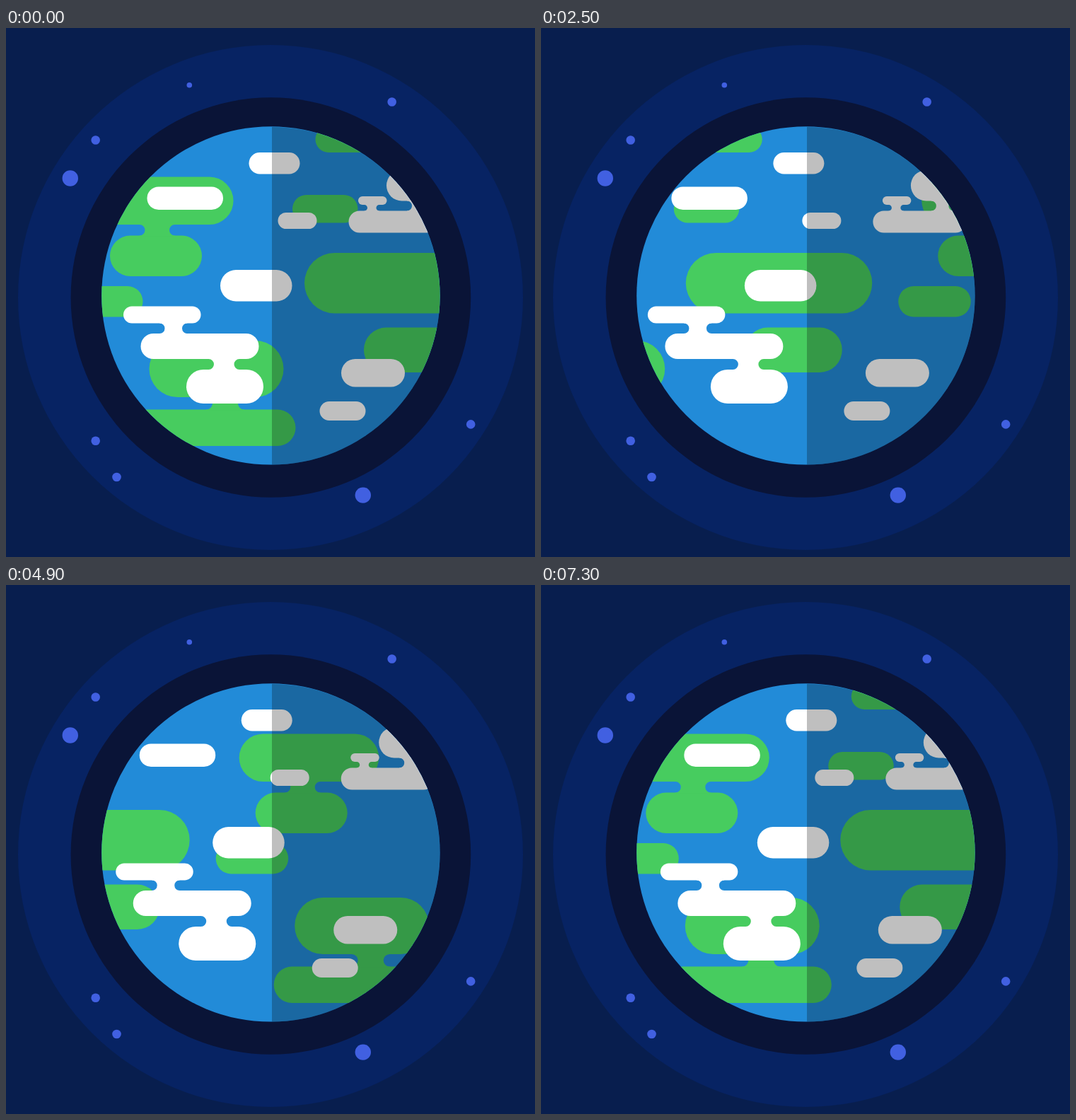
Animation of 748 by 748 pixels, one loop 7.4 s. Source, as an HTML page:

```html
<!DOCTYPE html>
<html lang="en">
<head>
<meta charset="utf-8">
<title>Turning planet</title>
<style>
  html, body { margin: 0; width: 100%; height: 100%; overflow: hidden; background: #081e4e; }
  svg { display: block; width: 100vw; height: 100vh; }
</style>
</head>
<body>
<svg viewBox="0 0 748 748">
  <defs>
    <clipPath id="globe"><circle cx="374.4" cy="378.4" r="239.2"/></clipPath>
  </defs>
  <rect width="748" height="748" fill="#081e4e"/>
  <circle cx="374" cy="381" r="357" fill="#072363"/>
  <circle cx="374.4" cy="381" r="282.8" fill="#0a1437"/>
  <g id="stars" fill="#4160e1"></g>
  <circle cx="374.4" cy="378.4" r="239.2" fill="#228bd8"/>
  <g clip-path="url(#globe)">
    <g id="surface"></g>
    <path d="M376 140A237.6 238.8 0 0 1 376 617.6Z" fill="#000" fill-opacity=".25"/>
  </g>
</svg>
<script>
const NS = 'http://www.w3.org/2000/svg';
const LOOP = 7400, STEP = 100, TURN = 7267;
const surface = document.getElementById('surface');
const stars = document.getElementById('stars');

function add(parent, tag, attrs) {
  const el = document.createElementNS(NS, tag);
  for (const k in attrs) el.setAttribute(k, attrs[k]);
  return parent.appendChild(el);
}

// A strip of rounded bars that repeats every `width` and slides to the left
function strip(id, fill, width) {
  const row = add(surface, 'g', { fill });
  const tile = add(row, 'g', { id });
  add(row, 'use', { href: '#' + id, x: width });

  return {
    bar(x, y, w, h) {
      add(tile, 'rect', { x, y, width: w, height: h, rx: h / 2 });
      return { top: y, bottom: y + h };
    },
    // Bridge with concave sides, w wide at its narrowest
    join(upper, lower, x, w) {
      const y0 = upper.bottom, y1 = lower.top, r = (y1 - y0) / 2;
      const a = x - r, b = x + w + r;
      add(tile, 'path', {
        d: `M${a} ${y0}A${r} ${r} 0 0 1 ${a} ${y1}v1H${b}v-1A${r} ${r} 0 0 1 ${b} ${y0}v-1H${a}Z`
      });
    },
    slide(turns) {
      row.setAttribute('transform', `translate(${-(turns % 1) * width} 0)`);
    }
  };
}

const land = strip('land', '#47cc5f', 631.5);
land.join(land.bar(124, 210.5, 197.5, 67.5), land.bar(147, 293.5, 130, 57.5), 196.5, 34.5);
land.join(land.bar(202.5, 442, 190, 80), land.bar(173, 539.5, 236.5, 51.5), 292, 36);
land.bar(437.5, 139, 92.5, 37);
land.bar(405, 236, 92.5, 39.5);
land.bar(422, 318, 263.5, 85.5);
land.bar(91, 365, 102.5, 43.5);
land.bar(506, 423.5, 137, 63.5);

const clouds = strip('clouds', '#fff', 471.3);
const base = clouds.bar(484.5, 258.5, 132, 31);
clouds.join(clouds.bar(498, 238, 40.5, 12), base, 511, 12.5);
clouds.join(clouds.bar(538, 201, 99.5, 43.5), base, 574, 17.5);
const middle = clouds.bar(190.5, 432, 167, 36);
clouds.join(clouds.bar(166, 393.5, 109.5, 24), middle, 224.5, 24.5);
clouds.join(middle, clouds.bar(255, 483, 109, 48), 294, 28.5);
clouds.bar(343.5, 176, 72, 30.5);
clouds.bar(199.5, 224.5, 107.5, 32.5);
clouds.bar(384.5, 261, 55, 23);
clouds.bar(303, 342, 101.5, 44.5);
clouds.bar(474, 468, 90, 39.5);
clouds.bar(443.5, 528, 65, 27);

function star(r, ...spots) {
  for (const [cx, cy] of spots) add(stars, 'circle', { cx, cy, r });
}
star(3.8, [259.3, 80.7]);
star(6.3, [545.7, 104.5], [126.7, 158.5], [657.2, 560.4], [126.7, 583.8], [156.5, 635]);
star(11.2, [90.8, 212.5], [504.8, 660.6]);

// Clouds circle three times while the land turns once
function draw(ms) {
  const t = Math.floor((ms % LOOP) / STEP) * STEP;
  const turn = Math.min(t / TURN, 0.998);
  land.slide(turn);
  clouds.slide(turn * 3);
}

const start = performance.now();
function tick() {
  draw(performance.now() - start);
  requestAnimationFrame(tick);
}
draw(0);
requestAnimationFrame(tick);
</script>
</body>
</html>
```
